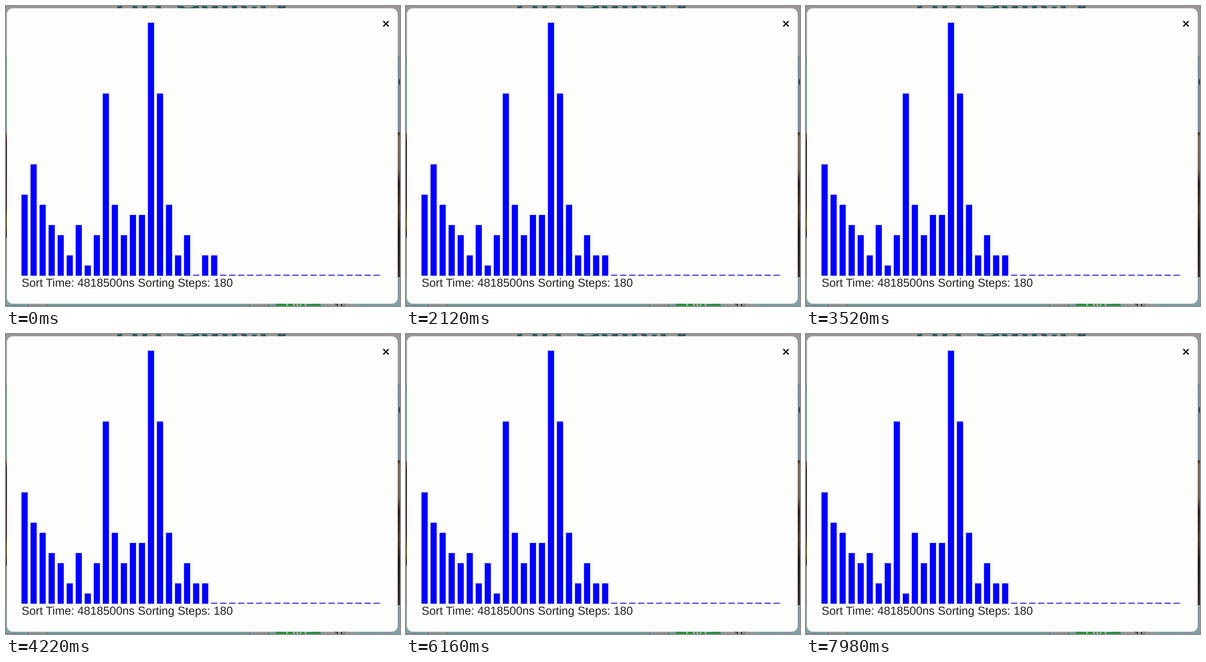
Recreate the animation shown at these times as an HTML page. Size 858 by 653 pixels, loop 8 s.

```html
<!DOCTYPE html>
<html lang="en">
<head>
<meta charset="utf-8">
<title>Sorting bars</title>
<style>
  html, body { margin: 0; width: 100%; height: 100%; overflow: hidden; background: #7f9fa3; }
  svg { display: block; width: 858px; height: 653px; font-family: "Liberation Sans", Arial, sans-serif; text-rendering: geometricPrecision; }
</style>
</head>
<body>
<svg viewBox="0 0 858 653">
  <defs>
    <linearGradient id="leftPhoto" x1="0" y1="0" x2="0" y2="1">
      <stop offset="0" stop-color="#86682f"/>
      <stop offset=".06" stop-color="#2c160e"/>
      <stop offset=".5" stop-color="#341a11"/>
      <stop offset=".62" stop-color="#6b5026"/>
      <stop offset=".72" stop-color="#33221a"/>
      <stop offset=".73" stop-color="#8f8a82"/>
      <stop offset="1" stop-color="#8f8a82"/>
    </linearGradient>
    <linearGradient id="rightPhoto" x1="0" y1="0" x2="0" y2="1">
      <stop offset="0" stop-color="#33251f"/>
      <stop offset=".03" stop-color="#806a58"/>
      <stop offset=".25" stop-color="#7a6350"/>
      <stop offset=".35" stop-color="#2c1f1a"/>
      <stop offset=".55" stop-color="#54422f"/>
      <stop offset=".7" stop-color="#241a17"/>
      <stop offset="1" stop-color="#3a2d27"/>
    </linearGradient>
  </defs>

  <!-- dimmed page behind the dialog -->
  <rect width="858" height="653" fill="#7f9fa3"/>
  <rect width="858" height="109" fill="#9b9896"/>
  <rect y="109" width="858" height="1" fill="#3d6c78"/>
  <rect y="110" width="858" height="165" fill="#709398"/>
  <rect y="275" width="429" height="315" fill="url(#leftPhoto)"/>
  <rect x="429" y="275" width="429" height="315" fill="url(#rightPhoto)"/>
  <text x="429" y="12" font-size="75" font-weight="bold" text-anchor="middle" fill="#285c5e">Art Gallery</text>
  <text x="854" y="172" font-size="26" fill="#222">c</text>
  <g fill="#9b9896">
    <rect x="48" y="640" width="41" height="13"/>
    <rect x="530" y="640" width="42" height="13"/>
    <rect x="692" y="640" width="66" height="13"/>
  </g>
  <path d="M48.5 640v13M88.5 640v13M530.5 640v13M571.5 640v13" stroke="#4d6467"/>
  <rect x="588" y="640" width="97" height="13" fill="#2b8f3b"/>
  <text x="637" y="663" font-size="25" font-weight="bold" text-anchor="middle" fill="#a5b5a5">LIKE</text>
  <text x="714" y="663" font-size="25" fill="#1c1c1c">16</text>
  <rect y="652" width="588" height="1" fill="#52787d"/>

  <!-- dialog -->
  <rect x="2" y="5" width="851" height="643" rx="13" fill="#fdfdfc"/>
  <text x="827.5" y="47.5" font-size="28" font-weight="bold" text-anchor="middle" fill="#222">×</text>
  <g id="bars" stroke="#224" stroke-opacity=".3" paint-order="stroke"></g>
  <rect id="edge" x="34" width="1" fill="#00007a"/>
  <text x="34" y="610.5" font-size="25.17" fill="#222">Sort Time: 4818500ns Sorting Steps: 180</text>
</svg>

<script>
const LOOP = 8000, FIRST_SWAP = 340, SWAP_EVERY = 1400;
const COUNT = 40, LEFT = 33.9, PITCH = 19.66, WIDTH = 13.2, BASE = 587, UNIT = 22.02;
const start = [8, 11, 7, 5, 4, 2, 5, 1, 4, 18, 7, 4, 6, 6, 25, 18, 7, 2, 4, 0, 2, 2];
while (start.length < COUNT) start.push(0);

// Each entry swaps a bar with its right neighbour.
const swaps = [19, 20, 0, 5, 7, 8];

const group = document.getElementById('bars');
const edge = document.getElementById('edge');
const bars = start.map((_, i) => {
  const bar = document.createElementNS('http://www.w3.org/2000/svg', 'rect');
  bar.setAttribute('x', LEFT + i * PITCH);
  bar.setAttribute('width', WIDTH);
  return group.appendChild(bar);
});

function setHeight(bar, height) {
  bar.setAttribute('y', BASE - height);
  bar.setAttribute('height', height);
}

function valuesAfter(done) {
  const values = [...start];
  for (const i of swaps.slice(0, done)) {
    [values[i], values[i + 1]] = [values[i + 1], values[i]];
  }
  return values;
}

let shown = -1;
function draw(now) {
  const t = now % LOOP;
  const done = Math.max(0, Math.floor((t - FIRST_SWAP) / SWAP_EVERY) + 1);
  if (done !== shown) {
    shown = done;
    const values = valuesAfter(done);
    values.forEach((value, i) => {
      setHeight(bars[i], value ? value * UNIT : 2);
      bars[i].setAttribute('fill', value ? '#00f' : '#3030e8');
    });
    setHeight(edge, values[0] * UNIT);
  }
  requestAnimationFrame(draw);
}
draw(performance.now());
</script>
</body>
</html>
```
